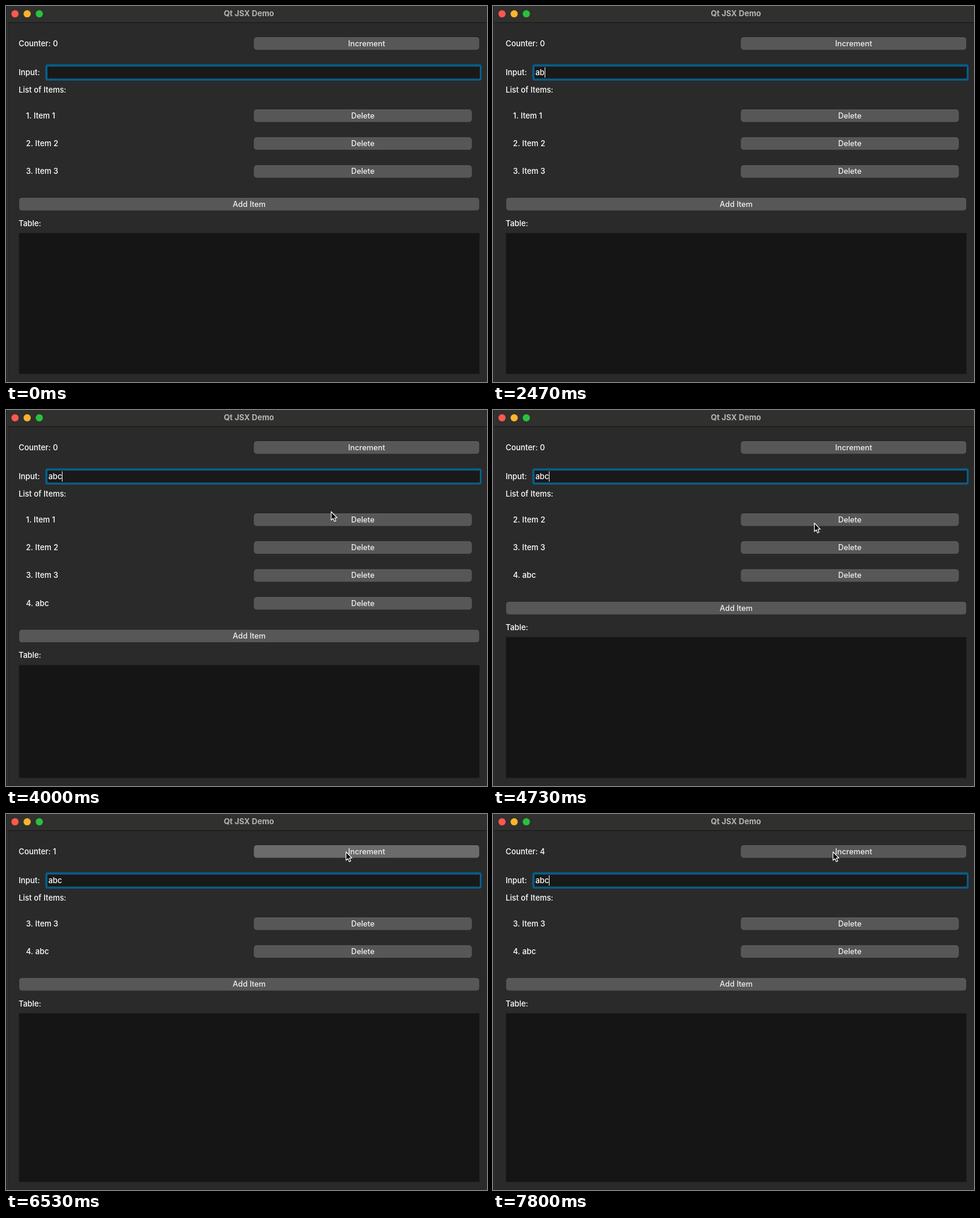
Write an HTML page with a canvas that moves like this. It is 800 px wide and 625 px high and loops after 7870 ms.

```html
<!DOCTYPE html>
<html lang="en">
<head>
<meta charset="utf-8">
<title>Qt JSX Demo</title>
<style>
  html, body { margin: 0; width: 100%; height: 100%; overflow: hidden; background: #2a2a2a; }
  canvas { display: block; width: 800px; height: 625px; }
</style>
</head>
<body>
<canvas id="stage" width="800" height="625"></canvas>
<script>
const ctx = document.getElementById('stage').getContext('2d');
const LOOP = 7870;
const ROW = 46.35;
const BLINK = 519;
const MOVE = 500;
const FACE = 'Inter, "Open Sans", sans-serif';

// Each move eases the mouse to a target and ends at the given time
const moves = [
  { end: 720, x: 550, y: 186 },   // comes in over the list
  { end: 1390, x: 405, y: 117 },  // input field
  { end: 3060, x: 387, y: 332 },  // Add Item
  { end: 3980, x: 546, y: 151 },
  { end: 4260, x: 534, y: 187 },  // first Delete
  { end: 6150, x: 565, y: 62 }    // Increment
];
const TYPE_START = 2000, TYPE_STEP = 300, WORD = 'abc';
const TYPE_END = TYPE_START + TYPE_STEP * (WORD.length - 1);

const press = (down, length) => ({ down, up: down + length });
const addPress = press(3125, 140);
const deletePresses = [press(4325, 200), press(4865, 135)];
const countPresses = [0, 1, 2, 3].map(i => press(6195 + 332 * i, 133));

const isDown = (t, presses) => presses.some(p => t >= p.down && t < p.up);
const clicks = (t, presses) => presses.filter(p => t >= p.up).length;

// The mouse is hidden until it enters and while the user types
function mouseAt(t) {
  if (t < moves[0].end || (t >= TYPE_START && t < TYPE_END)) return null;
  let [{ x, y }] = moves;
  for (const m of moves.slice(1)) {
    const u = Math.min(1, Math.max(0, (t - m.end + MOVE) / MOVE));
    const k = u * u * (3 - 2 * u);
    x += (m.x - x) * k;
    y += (m.y - y) * k;
  }
  return { x, y };
}

function caretOn(t) {
  if (t >= TYPE_START && t < TYPE_END) return true;
  const since = t < TYPE_START ? t - 125 : t - TYPE_END;
  return Math.floor(since / BLINK) % 2 === 0;
}

function box(x, y, w, h, r, fill) {
  ctx.beginPath();
  ctx.roundRect(x, y, w, h, r);
  ctx.fillStyle = fill;
  ctx.fill();
}

function label(text, x, y, { color = '#fff', align = 'left', weight = 450, size = 12.9 } = {}) {
  ctx.font = `${weight} ${size}px ${FACE}`;
  ctx.textAlign = align;
  ctx.fillStyle = color;
  ctx.fillText(text, x, y + 4.6);
}

function button(text, x, y, w, down) {
  box(x, y - 10, w, 20.5, 4.5, down ? '#787878' : '#636363');
  box(x, y - 9, w, 19.5, 4.5, down ? '#6b6b6b' : '#575757');
  label(text, x + w / 2, y, { color: '#f0f0f0', align: 'center', size: 12.75 });
}

function titleBar() {
  box(0, 0, 800, 27, 0, '#30302e');
  box(0, 27, 800, 1, 0, '#151515');
  ['#fe5850', '#fdb42c', '#29c23c'].forEach((color, i) => {
    box(9 + 20.2 * i, 7, 12, 12, 6, color);
  });
  label('Qt JSX Demo', 404, 12.7, { color: '#b4b4b2', align: 'center', weight: 650, size: 13 });
}

function inputField(t) {
  label('Input:', 21, 110.7);
  box(65.5, 97, 725.5, 27, 3.5, '#055f8c');
  box(69, 100.5, 719, 20.5, 0, '#2b3034');
  box(69, 101, 719, 19, 0, '#191919');
  const count = Math.max(0, Math.floor((t - TYPE_START) / TYPE_STEP) + 1);
  const typed = WORD.slice(0, count);
  label(typed, 70.5, 110.7);
  if (caretOn(t)) {
    const x = 70.7 + ctx.measureText(typed).width;
    box(Math.round(x), 102, 1, 17, 0, '#f4f4f4');
  }
}

function arrow({ x, y }) {
  ctx.save();
  ctx.translate(x, y);
  ctx.beginPath();
  [[0.5, 1], [0.5, 15], [3.7, 12.1], [5.9, 17.2], [8.3, 16.2], [6.2, 11.2], [10.3, 11.2]]
    .forEach(p => ctx.lineTo(...p));
  ctx.closePath();
  ctx.lineJoin = 'round';
  ctx.fillStyle = '#000';
  ctx.fill();
  ctx.strokeStyle = '#fff';
  ctx.lineWidth = 1.2;
  ctx.stroke();
  ctx.restore();
}

function draw(t) {
  box(0, 0, 800, 625, 0, '#2a2a2a');
  titleBar();

  label('Counter: ' + clicks(t, countPresses), 21, 62);
  button('Increment', 412.5, 62, 374.5, isDown(t, countPresses));
  inputField(t);
  label('List of Items:', 21, 139.7);

  const items = ['1. Item 1', '2. Item 2', '3. Item 3'];
  if (t >= addPress.up) items.push('4. ' + WORD);
  items.splice(0, clicks(t, deletePresses));
  items.forEach((item, i) => {
    const y = 182 + ROW * i;
    label(item, 33.3, y);
    button('Delete', 412.5, y, 362, i === 0 && isDown(t, deletePresses));
  });

  const y = 190 + ROW * items.length;
  button('Add Item', 22, y, 765, isDown(t, [addPress]));
  label('Table:', 21, y + 32.2);
  const top = y + 48;
  box(21, top, 767, 612 - top, 0, '#202020');
  box(22, top + 1, 765, 610 - top, 0, '#151515');

  // Window edge with the desktop behind it
  box(0, 0, 1, 625, 0, '#151515');
  box(1, 6, 1, 619, 0, '#3c3c3c');

  const mouse = mouseAt(t);
  if (mouse) arrow(mouse);
}

const start = performance.now();
function tick() {
  draw((performance.now() - start) % LOOP);
  requestAnimationFrame(tick);
}
tick();
</script>
</body>
</html>
```
